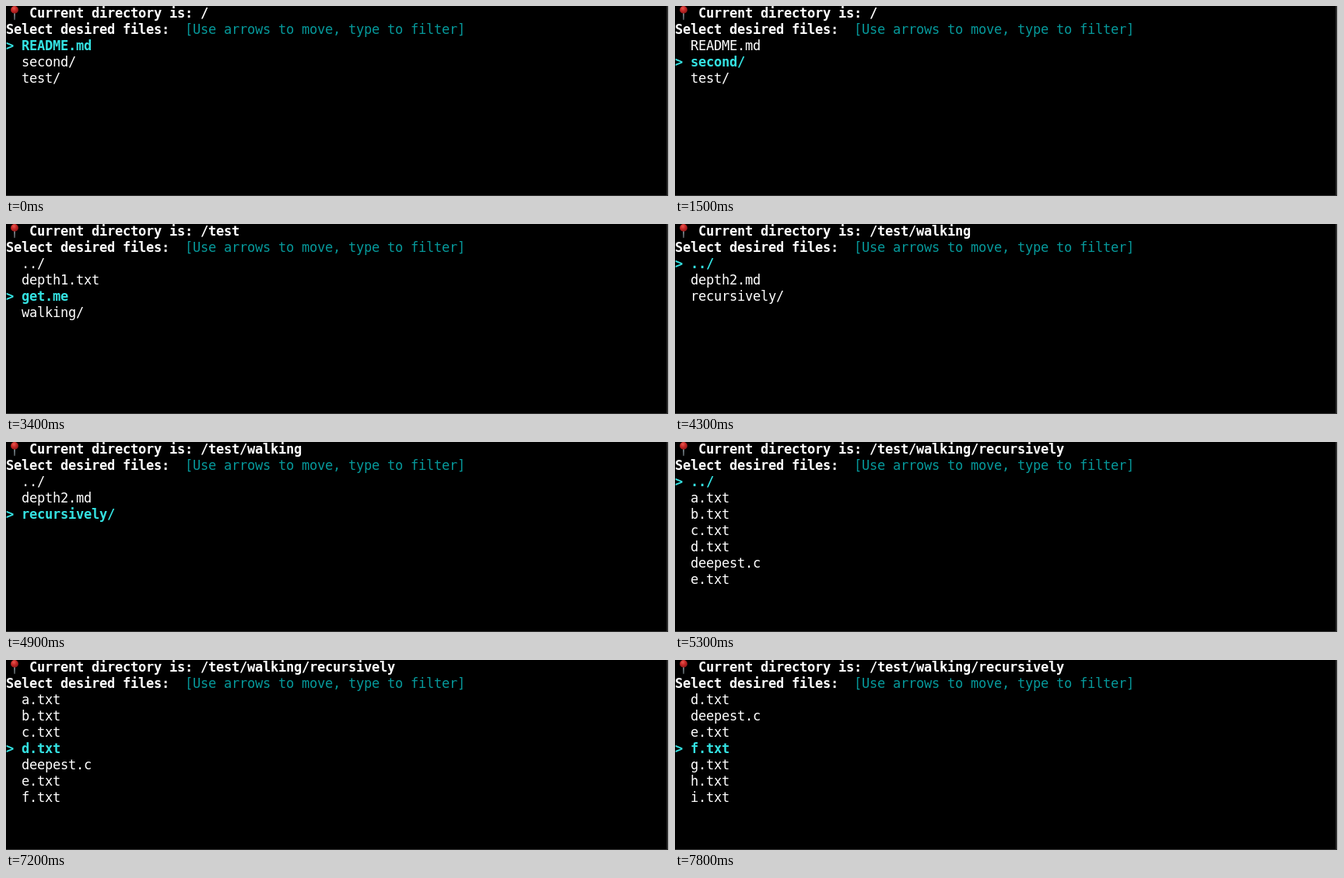
Recreate the animation shown at these times as an HTML page. Size 852 px wide and 245 px high, loop 8000 ms.

```html
<!DOCTYPE html>
<html lang="en">
<head>
<meta charset="utf-8">
<title>File picker</title>
<style>
  html, body { margin: 0; width: 100%; height: 100%; overflow: hidden; background: #000; }
  svg { display: block; width: 852px; height: 245px; }
  text { font: 17px "DejaVu Sans Mono", monospace; letter-spacing: -.235px; fill: #fff; white-space: pre; }
  .bold { font-weight: 700; }
  .hint { fill: #06989a; }
  .active { font-weight: 700; fill: #34e2e2; }
</style>
</head>
<body>
<svg viewBox="0 0 852 245">
  <defs>
    <radialGradient id="ball" cx=".4" cy=".3" r=".7">
      <stop offset="0" stop-color="#e8584e"/>
      <stop offset=".5" stop-color="#c62828"/>
      <stop offset="1" stop-color="#8e1717"/>
    </radialGradient>
  </defs>
  <rect width="852" height="245"/>
  <path d="M0 244h850v1H0z" fill="#333"/>
  <path d="M849 0h2v245h-2z" fill="#333"/>
  <path d="M851 0h1v245h-1z" fill="#ddd"/>
  <path d="M10.1 8h1.8l-.4 9.5-.5 .8-.5-.8z" fill="#8a979e"/>
  <circle cx="11" cy="4.9" r="4.9" fill="url(#ball)"/>
  <g id="screen"></g>
</svg>
<script>
const LOOP = 8000, CELL = 10, ROW = 21, BASE = 15, PAGE = 7;
const screen = document.getElementById('screen');

// Each folder: opening time, path, entries, and the times of the arrow presses.
const folders = [
  { at: 0, path: '/', files: ['README.md', 'second/', 'test/'], downs: [1500, 1800] },
  { at: 2400, path: '/test', files: ['../', 'depth1.txt', 'get.me', 'walking/'], downs: [3100, 3400, 3700] },
  { at: 4300, path: '/test/walking', files: ['../', 'depth2.md', 'recursively/'], downs: [4700, 4900] },
  { at: 5300, path: '/test/walking/recursively',
    files: ['../', 'a.txt', 'b.txt', 'c.txt', 'd.txt', 'deepest.c', 'e.txt', 'f.txt', 'g.txt', 'h.txt', 'i.txt'],
    downs: [6600, 6800, 7000, 7200, 7400, 7600, 7800] }
];

function put(col, row, string, style = '') {
  const node = document.createElementNS('http://www.w3.org/2000/svg', 'text');
  node.setAttribute('x', col * CELL);
  node.setAttribute('y', BASE + row * ROW);
  node.setAttribute('class', style);
  node.textContent = string;
  screen.append(node);
}

function render(folder, picked) {
  const { path, files } = folder;
  // Long lists scroll once the cursor reaches the middle of the page.
  const middle = PAGE >> 1;
  const top = Math.max(0, Math.min(picked - middle, files.length - PAGE));

  screen.replaceChildren();
  put(3, 0, 'Current directory is: ' + path, 'bold');
  put(0, 1, 'Select desired files:', 'bold');
  put(23, 1, '[Use arrows to move, type to filter]', 'hint');
  files.slice(top, top + PAGE).forEach((name, i) => {
    const active = top + i === picked;
    if (active) put(0, i + 2, '>', 'active');
    put(2, i + 2, name, active ? 'active' : '');
  });
}

let shown = '';
function tick(now) {
  const t = now % LOOP;
  const index = folders.findLastIndex(f => t >= f.at);
  const folder = folders[index];
  const picked = folder.downs.filter(d => t >= d).length;
  const state = index + ':' + picked;
  if (state !== shown) render(folder, picked);
  shown = state;
  requestAnimationFrame(tick);
}
tick(0);
</script>
</body>
</html>
```
